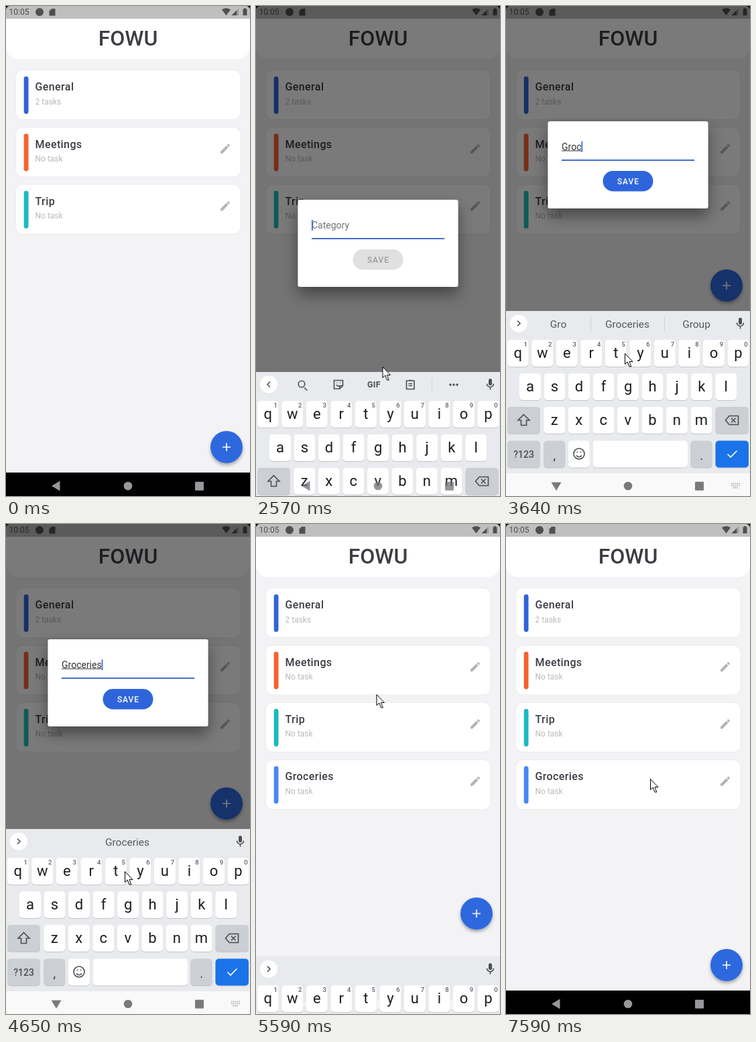
An HTML page that plays this animation: 364x731 px, repeating every 8 s.

```html
<!DOCTYPE html>
<html lang="en">
<head>
<meta charset="utf-8">
<title>Task categories</title>
<style>
html, body { margin: 0; width: 100%; height: 100%; overflow: hidden; background: #f3f3f5; }
svg { display: block; width: 100vw; height: 100vh; font-family: Roboto, sans-serif; }
.mid { text-anchor: middle; }
.line { fill: none; stroke: #4b4e52; stroke-width: 1.6; }
.title { font-size: 32px; font-weight: 500; fill: #3c3d45; }
.name { font-size: 16px; font-weight: 500; letter-spacing: .4px; fill: #3c3d45; }
.count { font-size: 12px; fill: #b9b9bb; }
.card { filter: drop-shadow(0 0 1px #0001); }
.letter { font-size: 22px; fill: #1c1d1f; }
.shifted .letter { text-transform: uppercase; }
.hint { font-size: 9.5px; font-weight: 500; fill: #5c5f63; }
.word { font-size: 15.5px; fill: #55585c; }
.save { fill: #e0e0e0; }
.saveText { font-size: 12px; font-weight: 500; letter-spacing: .9px; fill: #9b9b9b; }
.ready .save { fill: #2f65dc; }
.ready .saveText { fill: #fff; }
.ready #label { display: none; }

.move { animation: 8s linear infinite; }
#pointer { animation-name: pointer; }
#dim { animation-name: dim; }
#dialog { animation-name: dialog; }
#board { animation-name: board; }
#fab { animation-name: fab; }
#press { animation-name: press; }
#savePress { animation-name: savePress; }
#added { animation-name: added; animation-timing-function: step-end; }
#nav { animation-name: nav; animation-timing-function: step-end; }
#back { animation-name: back; animation-timing-function: step-end; transform-origin: 75px 716px; }

@keyframes pointer {
  0%, 1.87% { transform: translate(325px, 745px); }
  1.875% { transform: translate(325px, 712px); }
  2.75% { transform: translate(326px, 688px); }
  3.63% { transform: translate(328px, 668px); }
  4.5%, 6.6% { transform: translate(329px, 662px); }
  7.5%, 27.8% { transform: translate(329px, 659px); }
  32.1%, 34.2% { transform: translate(188.5px, 538px); }
  36.8%, 60.2% { transform: translate(177px, 518px); }
  63% { transform: translate(180px, 400px); }
  66.8%, 71.8% { transform: translate(179.5px, 254px); }
  75.6%, 77.4% { transform: translate(226px, 351px); }
  84.2%, 88.2% { transform: translate(214px, 368px); }
  91% { transform: translate(213px, 373px); }
  94.8%, 100% { transform: translate(215px, 380px); }
}
@keyframes dim {
  0%, 28.8% { opacity: 0; }
  31.2%, 68% { opacity: 1; }
  69.8%, 100% { opacity: 0; }
}
@keyframes dialog {
  0%, 29.8% { opacity: 0; transform: translateY(117px); }
  31.5%, 34.24% { opacity: 1; transform: translateY(117px); }
  34.25%, 68% { opacity: 1; transform: none; }
  69.3%, 100% { opacity: 0; transform: none; }
}
@keyframes board {
  0%, 30.8% { transform: translateY(277px); }
  32.1%, 34.24% { transform: translateY(91px); }
  34.25%, 68.9% { transform: translateY(0); }
  69.87% { transform: translateY(189px); }
  70.75% { transform: translateY(255px); }
  71.7%, 100% { transform: translateY(277px); }
}
@keyframes fab {
  0%, 34.24% { transform: translateY(0); }
  34.25%, 68.9% { transform: translateY(-241px); }
  69.87% { transform: translateY(-78px); }
  70.75% { transform: translateY(-20px); }
  71.7%, 100% { transform: translateY(0); }
}
@keyframes press {
  0%, 26.9% { opacity: 0; }
  27%, 30% { opacity: .07; }
  32%, 100% { opacity: 0; }
}
@keyframes savePress {
  0%, 67% { opacity: 0; }
  67.8%, 69% { opacity: .06; }
  70%, 100% { opacity: 0; }
}
@keyframes added {
  0% { opacity: 0; }
  69.4%, 100% { opacity: 1; }
}
@keyframes nav {
  0% { fill: #98989c; opacity: 1; }
  31.5% { fill: #707276; opacity: .75; }
  34.25% { fill: #7a7a7a; opacity: 1; }
  69.4% { fill: #fff; opacity: .5; }
  71.7%, 100% { fill: #98989c; opacity: 1; }
}
@keyframes back {
  0% { transform: none; }
  34.25% { transform: rotate(-90deg); }
  69.4%, 100% { transform: none; }
}
</style>
</head>
<body>
<svg viewBox="0 0 364 731" preserveAspectRatio="none">
  <defs>
    <filter id="soft" x="-30%" y="-30%" width="160%" height="180%">
      <feDropShadow dx="0" dy="3" stdDeviation="2.5" flood-opacity=".32"/>
    </filter>
    <filter id="deep" x="-30%" y="-40%" width="160%" height="200%">
      <feDropShadow dx="0" dy="11" stdDeviation="11" flood-opacity=".42"/>
    </filter>
  </defs>

  <rect width="364" height="731" fill="#f3f3f5"/>
  <path d="M0 19H364V61a18 18 0 0 1-18 18H18A18 18 0 0 1 0 61Z" fill="#fff"/>
  <text class="title mid" x="182" y="58.5">FOWU</text>
  <g id="cards"></g>

  <g id="fab" class="move">
    <circle cx="329" cy="658" r="24" fill="#2f67de" filter="url(#soft)"/>
    <circle id="press" class="move" cx="329" cy="658" r="24" fill="#fff"/>
    <path d="M323 658h12M329 652v12" stroke="#fff" stroke-width="1.7"/>
  </g>

  <rect y="696" width="364" height="35"/>
  <rect width="364" height="19" fill="#bfbfbf"/>
  <g fill="#505050">
    <text x="4.5" y="13.3" font-size="12">10:05</text>
    <circle cx="50" cy="9" r="6"/>
    <path d="M68 4h5.5v10.5h-9V7.5Z"/>
    <path d="M322 5.5q6.500-4.500 13 0L328.500 14Z"/>
    <path d="M347 3.500V14H336.500Z" opacity=".35"/>
    <path d="M344 6.500V14H336.500Z"/>
    <path d="M353.500 4.500h1.500v-1.200h3v1.200h1.500V14h-6Z"/>
  </g>
  <path d="M0 0H5Q1 1 0 5ZM364 0h-5q4 1 5 5Z"/>

  <rect id="dim" class="move" width="364" height="731" fill="#000" fill-opacity=".52"/>

  <g id="dialog" class="move">
    <rect x="62.5" y="172" width="239" height="130" rx="3" fill="#fff" filter="url(#deep)"/>
    <text id="label" x="83" y="215" font-size="14" fill="#747474">Category</text>
    <text id="typed" x="83" y="214.500" font-size="14" fill="#333"></text>
    <rect id="under" x="83" y="215.500" height="1" fill="#333"/>
    <rect id="caret" y="202" width="1.700" height="16" fill="#3468d8"/>
    <rect x="83" y="229" width="198" height="2" fill="#456fcf"/>
    <rect class="save" x="144.500" y="246" width="75" height="30.500" rx="15.200"/>
    <text class="saveText mid" x="182.400" y="265.500">SAVE</text>
    <rect id="savePress" class="move" x="144.500" y="246" width="75" height="30.500" rx="15.200"/>
  </g>

  <g id="board" class="move">
    <rect y="455" width="364" height="277" fill="#e8eaed"/>
    <rect y="697" width="364" height="35" fill="#f9f9f9"/>
    <circle cx="19" cy="473.500" r="13" fill="#fff"/>
    <path id="chevron" class="line"/>
    <g fill="#4b4e52">
      <rect x="347" y="465" width="5" height="10" rx="2.500"/>
      <path class="line" d="M344.500 472.500a5 5 0 0 0 10 0M349.500 477.500v4"/>
    </g>
    <g id="tools">
      <path class="line" d="M72 478.500l4.500 4"/>
      <circle class="line" cx="68" cy="473" r="4.800"/>
      <path class="line" d="M116.500 467.500h13v8l-4.500 4.500h-8.500ZM129.500 475.500h-4.500v4.500M120 474q3 4 5.500 1M120.500 471h1M125 471h1"/>
      <text class="mid" x="176" y="478.300" font-size="12.500" font-weight="700" letter-spacing=".4" fill="#4b4e52">GIF</text>
      <path class="line" d="M224.500 468h11.500v12.500h-11.500ZM227.500 472.500h5.500M227.500 475.500h5.500M228 467.500h4.500"/>
      <path d="M262.500 465v18" stroke="#cfd2d6"/>
      <g fill="#4b4e52"><circle cx="290" cy="474" r="1.700"/><circle cx="295" cy="474" r="1.700"/><circle cx="300" cy="474" r="1.700"/></g>
    </g>
    <g id="words" class="mid">
      <text class="word" x="78" y="479.500"></text>
      <text class="word" x="181" y="479.500"></text>
      <text class="word" x="284" y="479.500"></text>
      <path id="bars" d="M126.500 463.500v21M236.500 463.500v21" stroke="#cfd2d6"/>
    </g>
    <g id="keys" class="mid"></g>
    <path class="line" d="M26.500 609.500l8.500 8.500h-4.500v7.500h-8v-7.500h-4.500Z"/>
    <path class="line" d="M333 611.500h13.500v13h-13.500l-5.500-6.500ZM336 614.700l6.500 6.500M342.500 614.700l-6.500 6.500"/>
    <circle class="line" cx="109" cy="668" r="8"/>
    <path class="line" d="M105 670.500q4 4.500 8 0M105.500 665.500h1.800M110.700 665.500h1.800"/>
    <path d="M330.500 668.500l4.500 4.500 9.500-9.500" fill="none" stroke="#fff" stroke-width="1.700"/>
    <path d="M336 712.500h13M336 715.500h13M338.500 718.700h8" stroke="#a5a5a5" stroke-width="1.700" stroke-dasharray="1.700 1.100"/>
  </g>

  <g id="nav" class="move">
    <path id="back" class="move" d="M68 716l12.500-7.500v15Z"/>
    <circle cx="182" cy="716" r="6.300"/>
    <rect x="282" y="709.700" width="13" height="13" rx="1"/>
  </g>

  <path id="pointer" class="move" d="M.5.5V16.500L4.200 13 7 20h2.800L7 12.500h5Z" fill="#fff" stroke="#000" stroke-linejoin="round"/>
</svg>

<script>
const $ = id => document.getElementById(id);
const DURATION = 8000;

const pencil = 'M3 17.25V21h3.75L17.81 9.94l-3.75-3.75L3 17.25zM20.71 7.04c.39-.39.39-1.02 0-1.41l-2.34-2.34c-.39-.39-1.02-.39-1.41 0l-1.83 1.83 3.75 3.75 1.83-1.83z';
const categories = [
  ['General', '2 tasks', '#2f63da'],
  ['Meetings', 'No task', '#f6622d'],
  ['Trip', 'No task', '#1dbabb'],
  ['Groceries', 'No task', '#4886f7']
];

$('cards').innerHTML = categories.map(([name, count, color], i) => `
  <g transform="translate(0 ${96 + i * 85.4})"><g ${i === 3 ? 'id="added" class="move"' : ''}>
    <rect class="card" x="15" width="334.500" height="73" rx="10" fill="#fff"/>
    <rect x="26.700" y="9" width="6.800" height="56" rx="3.400" fill="${color}"/>
    <text class="name" x="43.500" y="30.300">${name}</text>
    <text class="count" x="43.500" y="50.700">${count}</text>
    ${i ? `<path d="${pencil}" fill="#b4b4b4" transform="translate(317.700 22.200) scale(.78)"/>` : ''}
  </g></g>`).join('');

const key = (x, y, w, fill = '#fff') =>
  `<rect x="${x}" y="${y + 1}" width="${w}" height="40" rx="5" fill="#c2c4c9"/>
   <rect x="${x}" y="${y}" width="${w}" height="40" rx="5" fill="${fill}"/>`;
const row = (letters, x, y, hints = '') => [...letters].map((c, i) => {
  const cx = x + i * 36.53;
  const hint = hints ? `<text class="hint" x="${cx + 11.5}" y="${y + 9.5}">${hints[i]}</text>` : '';
  return key(cx - 16, y, 32, '#fff') + `<text class="letter" x="${cx}" y="${y + 26.5}">${c}</text>` + hint;
}).join('');
const gray = '#cccfd4';

$('keys').innerHTML =
  row('qwertyuiop', 17.7, 498, '1234567890') +
  row('asdfghjkl', 36, 548) +
  key(2, 598, 49, gray) + row('zxcvbnm', 72.3, 598) + key(312.5, 598, 49.5, gray) +
  key(2, 648.5, 49, gray) + key(56.3, 648.5, 32, gray) + key(92.8, 648.5, 32) +
  key(129.5, 648.5, 141.5) + key(275.5, 648.5, 32, gray) + key(312.5, 648.5, 49.5, '#1a73e8') +
  `<text x="26.500" y="673.500" font-size="14" font-weight="500" fill="#4b4e52">?123</text>
   <text x="72.300" y="677" font-size="18" fill="#333">,</text>
   <text x="291.500" y="677" font-size="18" fill="#333">.</text>`;

// [start, typed text, suggestions]; no suggestions means the tool strip is shown
const steps = [
  [0, ''],
  [3030, 'G'],
  [3180, 'Gr'],
  [3260, 'Gr', 'G|Good|Great'],
  [3410, 'Gro', 'G|Good|Great'],
  [3480, 'Gro', 'Gr|Great|Group'],
  [3560, 'Groc', 'Gro|Group|Groceries'],
  [3640, 'Groc', 'Gro|Groceries|Group'],
  [3810, 'Groc', 'Groc|Groceries|Grocery'],
  [3960, 'Groce', 'Groc|Groceries|Grocery'],
  [4040, 'Grocer', 'Groce|Groceries|Grocery'],
  [4270, 'Groceri', 'Grocer|Groceries|Grocery'],
  [4340, 'Grocerie', 'Groceri|Groceries|Grocery'],
  [4420, 'Groceries', 'Grocerie|Groceries|'],
  [4650, 'Groceries', '|Groceries|'],
  [5510, 'Groceries', '||']
];
const wordNodes = $('words').querySelectorAll('text');
const show = (node, on) => { node.style.visibility = on ? 'visible' : 'hidden'; };

function render(t) {
  const [, typed, words] = steps.findLast(step => t >= step[0]);
  const parts = (words || '||').split('|');
  $('typed').textContent = typed;
  const width = typed ? $('typed').getComputedTextLength() : 0;
  $('under').setAttribute('width', width);
  $('caret').setAttribute('x', 83 + width);
  show($('caret'), t < 4920);
  $('dialog').classList.toggle('ready', typed !== '');
  $('keys').classList.toggle('shifted', t >= 2880 && t < 3030);
  wordNodes.forEach((node, i) => { node.textContent = parts[i]; });
  show($('bars'), parts[0] !== '');
  show($('tools'), !words);
  $('chevron').setAttribute('d', words ? 'M17 469.500l4 4-4 4' : 'M21 469.500l-4 4 4 4');
}

let start;
function tick(now) {
  start ??= now;
  render((now - start) % DURATION);
  requestAnimationFrame(tick);
}
render(0);
requestAnimationFrame(tick);
</script>
</body>
</html>
```
